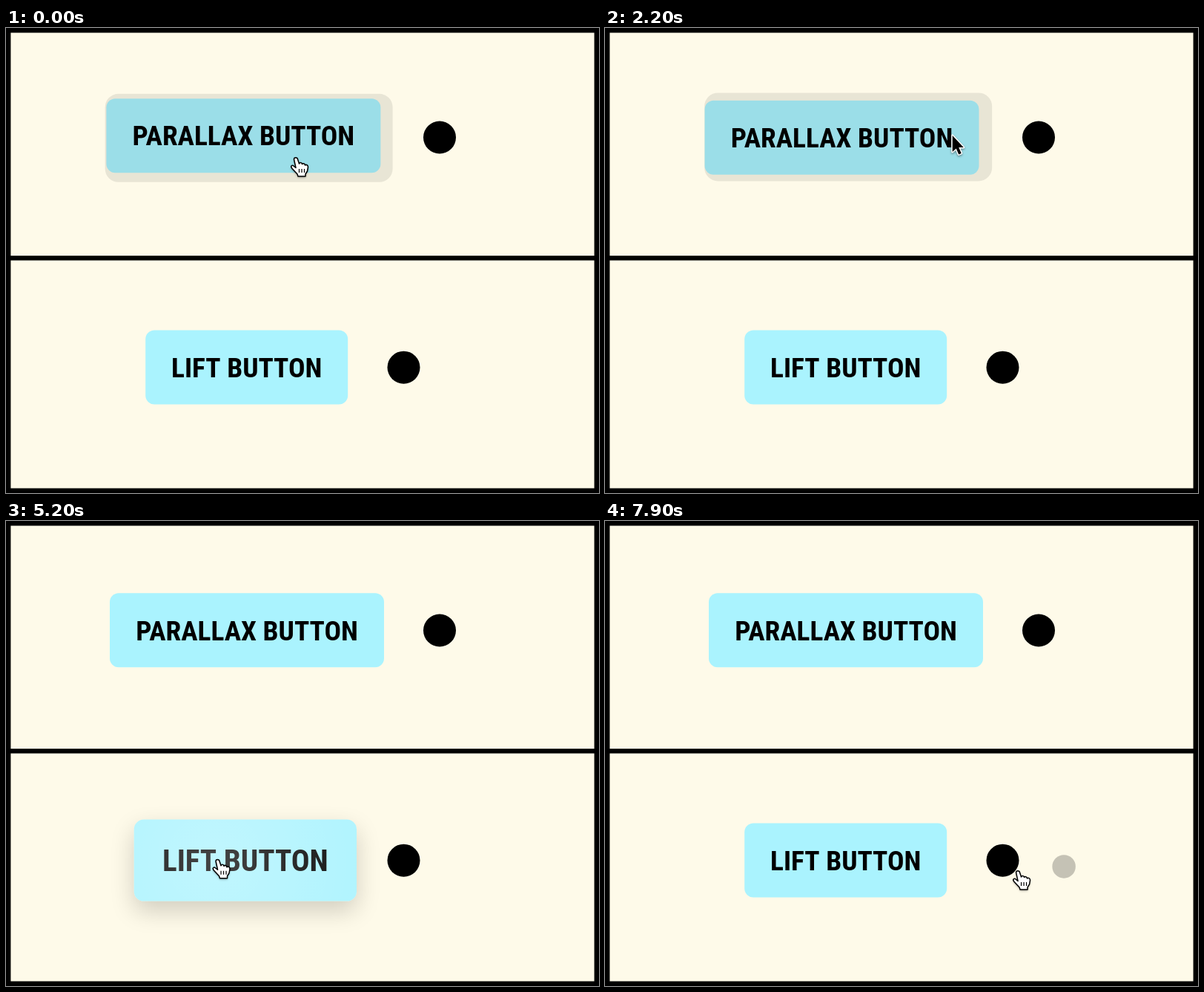
An HTML page with a canvas that plays this animation: 800x627 px, repeating every 8000 ms.

```html
<!DOCTYPE html>
<html lang="en">
<head>
<meta charset="utf-8">
<title>Button hover effects</title>
<style>
  html, body { margin: 0; width: 100%; height: 100%; overflow: hidden; background: #000; }
  canvas { display: block; width: 100%; height: 100%; }
</style>
</head>
<body>
<canvas id="stage" width="800" height="627"></canvas>
<script>
const ctx = document.getElementById('stage').getContext('2d');
const LOOP = 8000, STEP = 100, LAG = 100;
const CREAM = '#fefae9', AQUA = '#aaf3fe';
const FONT = 'bold condensed 37.4px "Roboto Condensed", Roboto, "Liberation Sans Narrow", sans-serif';

const button = (x, y, w, label) => ({ x, y, w, h: 100, label });
const wide = button(325, 147.2, 370, 'PARALLAX BUTTON');
const icon = button(585, 147.5, 113);
const lift = button(324.7, 457.6, 273, 'LIFT BUTTON');
const liftIcon = button(536.5, 457.7, 113);

const smooth = u => u * u * (3 - 2 * u);
const out = u => 1 - (1 - u) ** 3;
const linear = u => u;

// Places the pointer visits: time, x, y and the easing on the way there
const stops = [
  [0, 391, 176], [650, 607, 153], [1000, 607, 153], [1700, 336, 133], [1900, 336, 133],
  [2550, 636, 160], [2596, 636, 160], [3200, 557, 464, out], [3400, 557, 464],
  [4300, 340, 457], [5000, 288, 458], [5150, 288, 458], [5900, 94, 437], [6100, 94, 437],
  [6850, 530, 460], [7660, 706, 456], [LOOP, 495, 480, linear]
];

function pointer(t) {
  t = Math.max(0, t);
  const i = stops.findIndex(s => s[0] > t);
  const [t0, x0, y0] = stops[i - 1], [t1, x1, y1, ease = smooth] = stops[i];
  const u = ease((t - t0) / (t1 - t0));
  return { x: x0 + (x1 - x0) * u, y: y0 + (y1 - y0) * u };
}

const inside = (p, b) => Math.abs(p.x - b.x) < b.w / 2 && Math.abs(p.y - b.y) < b.h / 2;

// Eased share of the recent past that the trailing pointer spent on a button
function hover(t, b) {
  const samples = 18;
  let n = 0;
  for (let d = 0; d < samples; d++) n += inside(pointer(t - LAG - d * 10), b);
  return smooth(n / samples);
}

function box(x, y, w, h, r) {
  ctx.beginPath();
  ctx.roundRect(x - w / 2, y - h / 2, w, h, r);
}

function face(b) {
  if (b.label) {
    box(0, 0, b.w, b.h, 12);
    ctx.fillStyle = AQUA;
    ctx.fill();
    ctx.fillStyle = '#000';
    ctx.fillText(b.label, 0, 13.3);
  } else {
    ctx.beginPath();
    ctx.arc(0, 0, 22, 0, 7);
    ctx.fillStyle = '#000';
    ctx.fill();
  }
}

const toward = (b, p, k) => [b.x + (p.x - b.x) * k, b.y + (p.y - b.y) * k];

function parallax(b, p, k) {
  ctx.save();
  ctx.translate(...toward(b, p, -0.07 * k));
  face(b);
  ctx.restore();
}

// Only the shadow shows: its caster stands far above the stage
function shadow(b, k, scale) {
  const far = 1000;
  ctx.save();
  ctx.beginPath();
  ctx.rect(-400, -300, 800, 600);
  ctx.roundRect(-b.w / 2, -b.h / 2, b.w, b.h, 12);
  ctx.clip('evenodd');
  ctx.shadowColor = `rgba(0,0,0,${0.18 * k})`;
  ctx.shadowBlur = 32;
  ctx.shadowOffsetY = far * scale + 13;
  box(0, -far, b.w, b.h, 12);
  ctx.fillStyle = '#000';
  ctx.fill();
  ctx.restore();
}

function lifted(b, p, k) {
  const dx = p.x - b.x, dy = p.y - b.y, scale = 1 + 0.1 * k;
  ctx.save();
  ctx.translate(...toward(b, p, 0.05 * k));
  ctx.scale(scale, scale);
  if (k) shadow(b, k, scale);
  face(b);
  if (k) {
    const glow = ctx.createRadialGradient(dx, dy, 0, dx, dy, 170);
    glow.addColorStop(0, `rgba(255,255,255,${0.27 * k})`);
    glow.addColorStop(1, `rgba(255,255,255,${0.09 * k})`);
    box(0, 0, b.w, b.h, 12);
    ctx.fillStyle = glow;
    ctx.fill();
  }
  ctx.restore();
}

// Soft dot that grows into a highlight behind the hovered parallax button
function dot(p, kWide, kIcon, kLift) {
  const glow = (b, k) => [...toward(b, p, k), b.w + 18, b.h + 19, 18, 0.085];
  const rest = [p.x, p.y, 31.5, 31.5, 15.75, 0.225];
  const onWide = glow(wide, 0.04), onIcon = glow(icon, 0.07);
  const mix = rest.map((v, i) => v + (onWide[i] - v) * kWide + (onIcon[i] - v) * kIcon);
  const alpha = mix.pop() * Math.max(0, 1 - kLift);
  box(...mix);
  ctx.fillStyle = `rgba(0,0,0,${alpha})`;
  ctx.fill();
}

const arrow = new Path2D('M0 0V22L5 17.5L8.5 25.5L12 24L8.5 16H15Z');
const hand = new Path2D('M-2.5 1C-2.5-2 2-2 2.5 1L4.5 7C5 5 8 5 8.5 7.5C9.5 6 12 6.5 12.5 9' +
  'C14 7.5 16.5 9 16.5 11.5L15.5 17L13 21V24H3L2 21L-5 13.5C-8 10-5 8-2.5 10.5L0 12.5Z');
const creases = new Path2D('M4.5 14V19M8 14V19M11.5 14V19');

function cursor(p, isHand) {
  ctx.save();
  ctx.translate(p.x, p.y);
  ctx.lineJoin = 'round';
  ctx.shadowColor = 'rgba(0,0,0,.4)';
  ctx.shadowBlur = 3;
  ctx.shadowOffsetY = 1.5;
  if (isHand) {
    ctx.fillStyle = '#fff';
    ctx.fill(hand);
    ctx.shadowColor = 'transparent';
    ctx.strokeStyle = '#000';
    ctx.lineWidth = 1.5;
    ctx.stroke(hand);
    ctx.lineWidth = 1.2;
    ctx.stroke(creases);
  } else {
    ctx.strokeStyle = '#fff';
    ctx.lineWidth = 3;
    ctx.stroke(arrow);
    ctx.shadowColor = 'transparent';
    ctx.fillStyle = '#000';
    ctx.fill(arrow);
  }
  ctx.restore();
}

function draw(t) {
  const now = pointer(t), late = pointer(t - LAG);
  const [kWide, kIcon, kLift, kLiftIcon] = [wide, icon, lift, liftIcon].map(b => hover(t, b));

  ctx.fillStyle = '#000';
  ctx.fillRect(0, 0, 800, 627);
  ctx.fillStyle = CREAM;
  ctx.fillRect(6.4, 6.4, 787.2, 300.6);
  ctx.fillRect(6.4, 313.4, 787.2, 307.2);

  ctx.font = FONT;
  ctx.textAlign = 'center';
  parallax(wide, late, kWide);
  parallax(icon, late, kIcon);
  lifted(liftIcon, late, kLiftIcon);
  lifted(lift, late, kLift);
  dot(late, kWide, kIcon, kLift + kLiftIcon);
  cursor(now, t < 300 || inside(now, lift) || inside(now, liftIcon));
}

const start = performance.now();
function tick() {
  const t = (performance.now() - start) % LOOP;
  draw(Math.floor(t / STEP) * STEP);
  requestAnimationFrame(tick);
}
tick();
</script>
</body>
</html>
```
